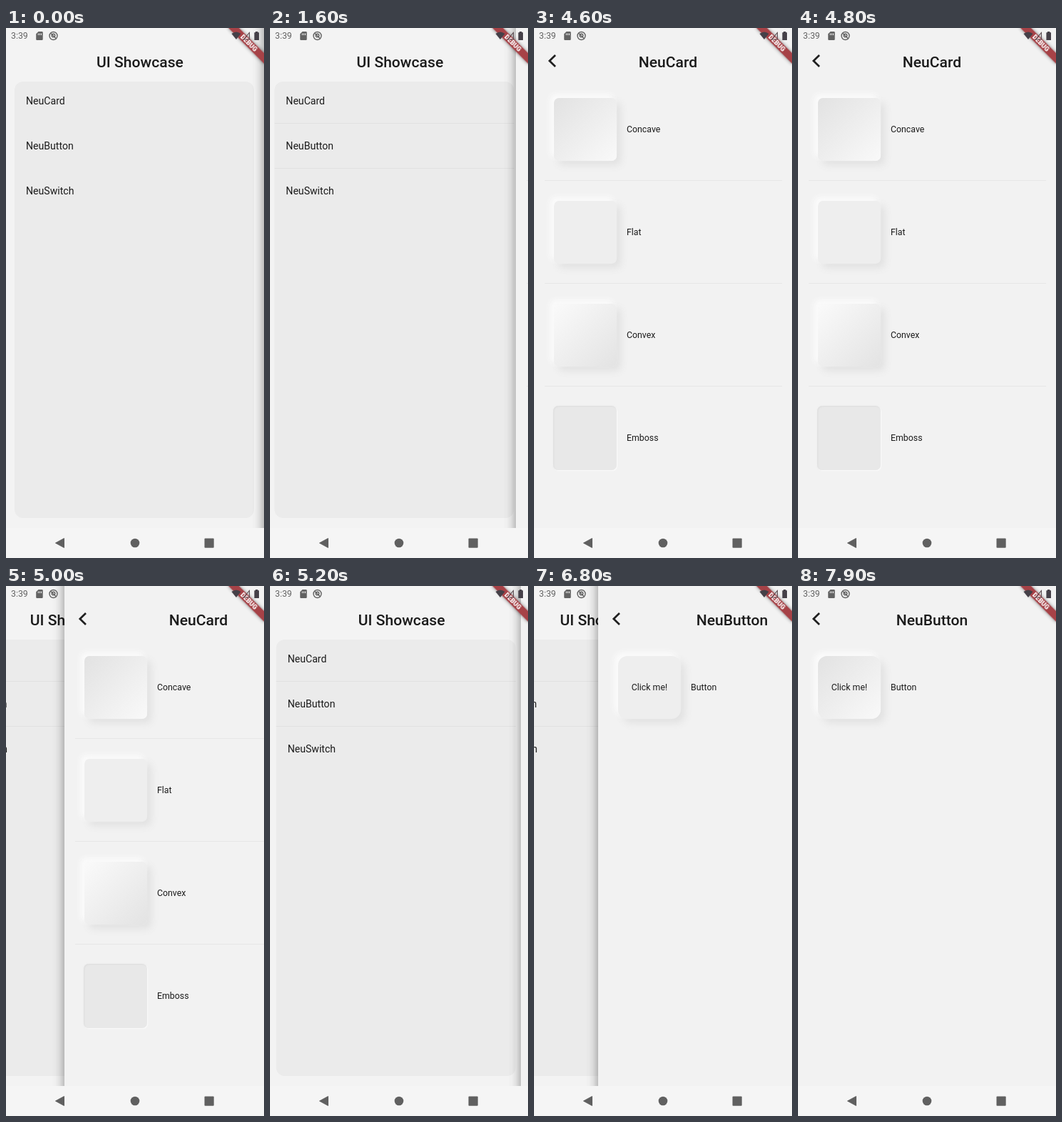
Animation of 362 by 742 pixels, one loop 8000 ms. Source, as an HTML page:

```html
<!DOCTYPE html>
<html lang="en">
<head>
<meta charset="utf-8">
<title>UI Showcase</title>
<style>
@property --x { syntax: "<number>"; inherits: true; initial-value: 362; }
@property --press { syntax: "<number>"; inherits: true; initial-value: 0; }

html, body { margin: 0; width: 100%; height: 100%; overflow: hidden; }
.stage {
  position: relative; width: 362px; height: 742px; overflow: hidden;
  background: #f3f3f3; color: #1b1b1b;
  font: 12.33px/20px Roboto, sans-serif;
  animation: slide 8s -10ms step-end infinite;
}
.stage * { position: absolute; box-sizing: border-box; }

/* Pages: --x is the left edge of the top page, the list trails at a third */
.page { left: 0; top: 0; width: 362px; height: 700px; background: #f2f2f2; }
.list { background: #f3f3f3; transform: translateX(calc((var(--x) - 362) / 3 * 1px)); }
.top { transform: translateX(calc(var(--x) * 1px)); }
.top::before {
  content: ""; position: absolute; left: -18px; top: 0; width: 18px; height: 100%;
  background: linear-gradient(to right, #0000, #00000004 30%, #00000012 60%, #00000038);
}
.cards { animation: cards 8s -10ms step-end infinite; }
.button { animation: button 8s -10ms step-end infinite; }

h1 {
  left: 88px; top: 35px; width: 200px; margin: 0; text-align: center;
  font-size: 21.1px; font-weight: 500; line-height: 25px;
}
.back { left: 19px; top: 36px; width: 14px; height: 20px; fill: none; stroke: #202020; stroke-width: 2.7; }

.panel { left: 12px; top: 75px; width: 336px; height: 611px; border-radius: 12px; background: #ebebeb; }
.panel span { left: 16px; font-size: 14.1px; }
hr { margin: 0; border: 0; height: 1px; background: #e7e7e7; left: 15px; width: 333px; }
.panel hr { left: 0; width: 336px; background: #e1e1e1; animation: rules 8s -10ms step-end infinite; }

.row { left: 0; width: 362px; height: 144px; }
.row > span { left: 130px; top: 62px; }
.tile {
  left: 28px; top: 28px; width: 88px; height: 88px; border-radius: 7px; background: #eee;
  box-shadow: -5px -5px 9px #fcfcfc, 6px 6px 11px #e1e1e1;
}
.concave { background: linear-gradient(135deg, #e2e2e2, #f9f9f9); }
.convex { background: linear-gradient(135deg, #fafafa, #e3e3e3); }
.emboss {
  left: 26.5px; top: 26.5px; width: 89px; height: 90px; background: #e8e8e8;
  box-shadow: inset 1px 1px 2px #dedede, 1px 1px 1.5px #fcfcfc, 0 0 3px #ececec;
}
.push { border-radius: 13px; text-align: center; line-height: 88px; }
.push i { inset: 0; border-radius: 13px; opacity: var(--press); animation: press 8s -10ms step-end infinite; }
.push span { left: 0; width: 88px; }

.system { left: 0; top: 0; }
.ribbon { filter: drop-shadow(0 0 2.5px #0007); }

@keyframes slide {
  0% { --x: 362; }
  20% { --x: 345; }
  21.25% { --x: 98; }
  22.5% { --x: 17; }
  23.75% { --x: 3; }
  25% { --x: 1; }
  57.5% { --x: 0; }
  62.5% { --x: 82; }
  63.75% { --x: 300; }
  65% { --x: 352; }
  66.25% { --x: 360; }
  67.5% { --x: 362; }
  85% { --x: 90; }
  86.25% { --x: 13; }
  87.5% { --x: 1; }
  97.5%, 100% { --x: 0; }
}
@keyframes cards { 0% { visibility: visible; } 70%, 100% { visibility: hidden; } }
@keyframes button { 0% { visibility: hidden; } 70%, 100% { visibility: visible; } }
@keyframes press { 0% { --press: 0; } 97.5% { --press: .5; } 98.75%, 100% { --press: 1; } }
@keyframes rules { 0% { opacity: 0; } 3.75%, 100% { opacity: 1; } }
</style>
</head>
<body>
<div class="stage">
  <div class="page list">
    <h1>UI Showcase</h1>
    <div class="panel">
      <span style="top:17px">NeuCard</span>
      <hr style="top:58px">
      <span style="top:80px">NeuButton</span>
      <hr style="top:121px">
      <span style="top:143px">NeuSwitch</span>
    </div>
  </div>

  <div class="page top cards">
    <svg class="back"><path d="M11 2 2.8 10 11 18"/></svg>
    <h1>NeuCard</h1>
    <div class="row" style="top:70px"><div class="tile concave"></div><span>Concave</span></div>
    <hr style="top:213px">
    <div class="row" style="top:214px"><div class="tile"></div><span>Flat</span></div>
    <hr style="top:357px">
    <div class="row" style="top:358px"><div class="tile convex"></div><span>Convex</span></div>
    <hr style="top:501px">
    <div class="row" style="top:502px"><div class="tile emboss"></div><span>Emboss</span></div>
  </div>

  <div class="page top button">
    <svg class="back"><path d="M11 2 2.8 10 11 18"/></svg>
    <h1>NeuButton</h1>
    <div class="row" style="top:70px">
      <div class="tile push"><i class="concave"></i><span>Click me!</span></div>
      <span>Button</span>
    </div>
  </div>

  <svg class="system" width="362" height="742" viewBox="0 0 362 742">
    <path fill="#f5f5f5" d="M0 700h362v42H0z"/>
    <g fill="#606060">
      <path stroke="#606060" stroke-linejoin="round" d="M69.5 721 81.5 714.5v13z"/>
      <circle cx="181" cy="721" r="6.3"/>
      <rect x="278.5" y="714.5" width="13.2" height="13.2" rx="1"/>
    </g>
    <g class="ribbon" transform="translate(362) rotate(45)">
      <path fill="#a64247" d="M-36 24.7h72v10.6h-72z"/>
      <text y="33.2" text-anchor="middle" fill="#fff" font-size="9" font-weight="900">DEBUG</text>
    </g>
    <g fill="#626262">
      <text x="7" y="15.4" font-size="12.33">3:39</text>
      <path d="M45.5 5H50.5q1.2 0 1.2 1.2V15.8q0 1.2-1.2 1.2H43.4q-1.2 0-1.2-1.2V8.3z"/>
      <path stroke="#f3f3f3" d="M45.3 7.5v2.6M47.4 7.5v2.6M49.5 7.5v2.6"/>
      <g fill="none" stroke="#626262" stroke-width="1.4">
        <circle cx="66.5" cy="11" r="5.5"/>
        <circle cx="66.5" cy="10.6" r="2.3"/>
        <path d="M63 7.5 70 14.5"/>
      </g>
    </g>
    <g fill="#454048">
      <path d="M316.5 8q6.5-5 13 0L323 16z"/>
      <path fill="none" stroke="#5a4a50" stroke-width="1.1" d="M341.5 6.5V16H333.5z"/>
      <path d="M350 5h3.4v1.3h1.6V17h-6.6V6.3H350z"/>
    </g>
  </svg>
</div>
</body>
</html>
```
